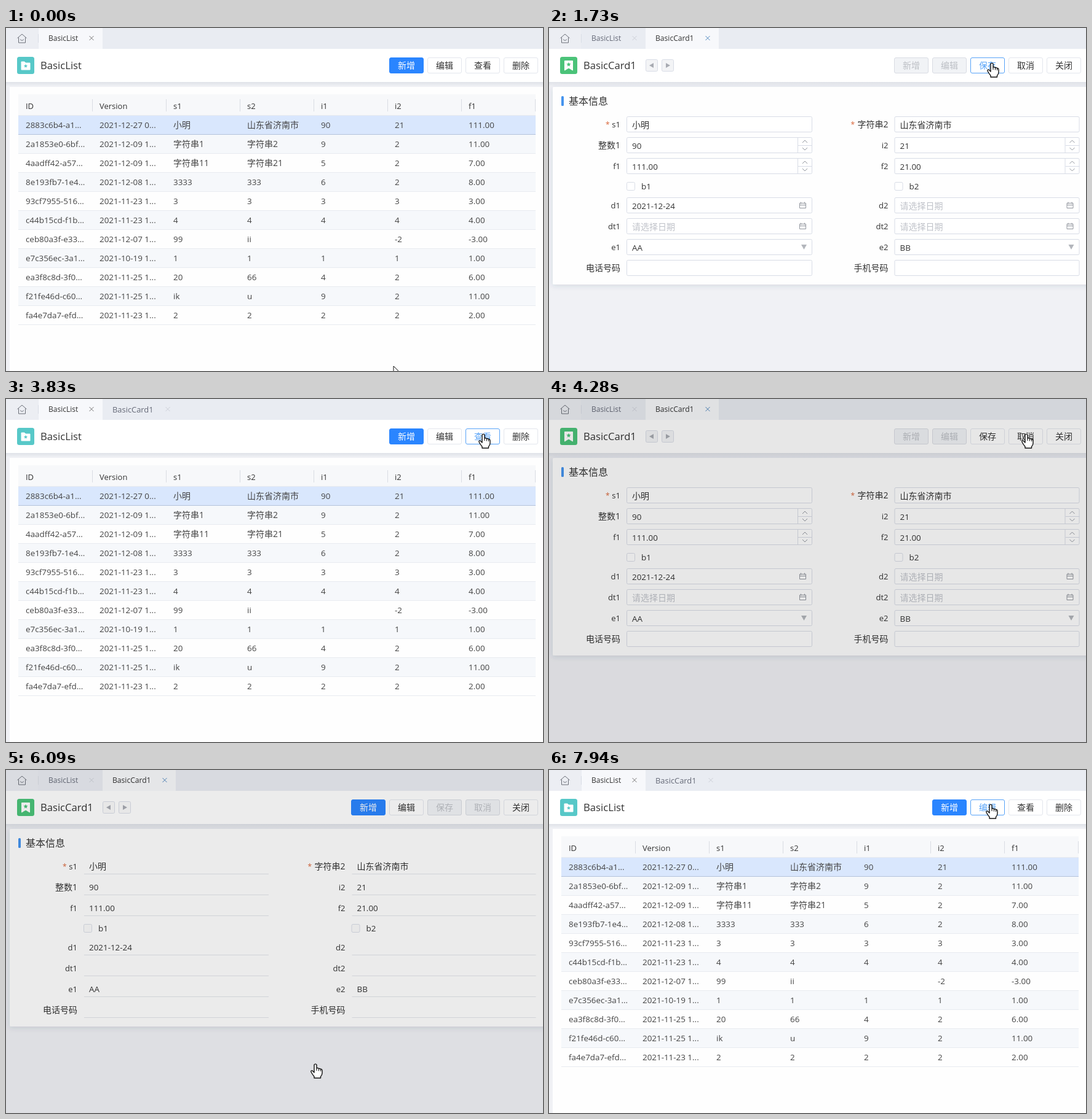
An HTML page that plays this animation: 873x559 px, repeating every 8000 ms.

```html
<!DOCTYPE html>
<html lang="zh-CN">
<head>
<meta charset="utf-8">
<title>BasicList</title>
<style>
html,body{margin:0;width:100%;height:100%;overflow:hidden;background:#f0f1f5}
svg{display:block;width:873px;height:559px}
text{font-family:'Open Sans','Noto Sans CJK SC','Noto Sans CJK',sans-serif;white-space:pre}
</style>
</head>
<body>
<svg viewBox="0 0 873 559">
  <defs>
    <linearGradient id="fall" x2="0" y2="1">
      <stop stop-color="#dfe2e8"/><stop offset="1" stop-color="#f0f1f5"/>
    </linearGradient>
    <filter id="soft" x="-5%" y="-5%" width="110%" height="115%">
      <feDropShadow dx="0" dy="2" stdDeviation="4" flood-color="#34405a" flood-opacity=".14"/>
    </filter>
  </defs>
  <g id="list"></g><g id="card"></g><g id="tabs"></g>
  <rect id="mask" width="873" height="559" opacity="0"/>
  <g id="modal"></g>
  <g id="arrow"><path d="M0 0V16.5L4 13L6.8 19L9.3 18L6.6 12H12Z" fill="#fff" stroke="#111" stroke-linejoin="round"/></g>
  <g id="hand"><path d="M-2 1.5Q0-1.2 2 1.5V7Q4 5.8 5.5 7.8Q7.3 6.7 8.6 8.7Q10.8 8 11 11V15Q11 18 8.5 20.5V23H-2V20.5Q-5 17-7 13Q-7.6 10.5-5 11L-2 14Z" fill="#fff" stroke="#111" stroke-width="1.4" stroke-linejoin="round"/><path d="M2 7V11M5.5 8V11.5M8.6 9V12" stroke="#111" stroke-width="1.1"/></g>
</svg>
<script>
const LOOP = 8000;
const BLUE = '#2a85ff', HOVER = '#57a3f8', PRESS = '#2468c8', INK = '#333', LINE = '#d8dce6';
const $ = id => document.getElementById(id);
const isHan = s => /[\u4e00-\u9fff]/.test(s);

const text = (x, y, s, size = isHan(s) ? 14 : 13.4, fill = INK, anchor = 'start') =>
  `<text x="${x}" y="${y + size * .36}" font-size="${size}" fill="${fill}" text-anchor="${anchor}">${s}</text>`;
const rect = (x, y, w, h, fill, r = 0, more = '') =>
  `<rect x="${x}" y="${y}" width="${w}" height="${h}" rx="${r}" fill="${fill}" ${more}/>`;
const box = (x, y, w, h, fill, stroke, r = 2) =>
  rect(x + .5, y + .5, w - 1, h - 1, fill, r, `stroke="${stroke}"`);
const path = (d, stroke, fill = 'none', w = 1) =>
  `<path d="${d}" fill="${fill}" stroke="${stroke}" stroke-width="${w}"/>`;
const cross = (x, color) => path(`M${x - 3.5} 13l7 7m0-7l-7 7`, color);

function star(x, y, r) {
  let d = '';
  for (let i = 0; i < 10; i++) {
    const a = Math.PI * (i / 5 - .5), k = i % 2 ? r * .45 : r;
    d += (i ? 'L' : 'M') + (x + k * Math.cos(a)).toFixed(2) + ' ' + (y + k * Math.sin(a)).toFixed(2);
  }
  return d + 'Z';
}

function button(x, label, look) {
  const [fill, stroke, ink] = {
    main: [BLUE, BLUE, '#fff'],
    off: ['#f1f3f6', '#d9dce3', '#bcbfc5'],
    hover: ['#fff', HOVER, HOVER],
    press: ['#fff', PRESS, PRESS]
  }[look] || ['#fff', '#e3e6ed', INK];
  return box(x, 48, 56, 26, fill, stroke, 2.5) + text(x + 28, 61, label, 14, ink, 'middle');
}

const page = () => rect(0, 34, 873, 525, '#f0f1f5') + rect(0, 88, 873, 7, 'url(#fall)') + rect(0, 34, 873, 54, '#fff');

const heads = ['ID', 'Version', 's1', 's2', 'i1', 'i2', 'f1'];
const rows = `2883c6b4-a1...|2021-12-27 0...|小明|山东省济南市|90|21|111.00
2a1853e0-6bf...|2021-12-09 1...|字符串1|字符串2|9|2|11.00
4aadff42-a57...|2021-12-09 1...|字符串11|字符串21|5|2|7.00
8e193fb7-1e4...|2021-12-08 1...|3333|333|6|2|8.00
93cf7955-516...|2021-11-23 1...|3|3|3|3|3.00
c44b15cd-f1b...|2021-11-23 1...|4|4|4|4|4.00
ceb80a3f-e33...|2021-12-07 1...|99|ii||-2|-3.00
e7c356ec-3a1...|2021-10-19 1...|1|1|1|1|1.00
ea3f8c8d-3f0...|2021-11-25 1...|20|66|4|2|6.00
f21fe46d-c60...|2021-11-25 1...|ik|u|9|2|11.00
fa4e7da7-efd...|2021-11-23 1...|2|2|2|2|2.00`.split('\n').map(r => r.split('|'));

function listView(hot, look, hotRow) {
  let s = page() + rect(6, 96, 867, 463, '#fefefe');
  s += rect(18, 47, 28, 28, '#57c8c8', 3.5);
  s += path('M25 55H30L32 57H39V68H25Z', '#fff', '#fff') + path(star(32, 62, 3.2), 'none', '#57c8c8');
  s += text(56, 61, 'BasicList', 16.7);
  ['新增', '编辑', '查看', '删除'].forEach((b, i) =>
    s += button(623 + 62 * i, b, i === 0 ? 'main' : i === hot ? look : ''));
  s += rect(20, 108, 841, 34, '#f7f8fa') + rect(20, 142, 841, 1, '#e6e9ef');
  heads.forEach((h, i) => {
    s += text(32 + 120 * i, 127, h, 13) + rect(140 + 120 * i, 116, 1, 20, '#d9dce3');
  });
  rows.forEach((r, j) => {
    const y = 143 + 31 * j;
    const fill = j === 0 ? '#d9e7fd' : j === hotRow ? '#f0f5fd' : j % 2 ? '#f6f8fb' : '#fefefe';
    s += rect(20, y, 841, 30, fill) + rect(20, y + 30, 841, 1, j ? '#e8ebf0' : '#b4c3dc');
    r.forEach((c, i) => s += text(32 + 120 * i, y + 15, c, undefined, '#444'));
  });
  return s;
}

const fields = [
  ['*s1', '小明', '*字符串2', '山东省济南市', 'text', 157],
  ['整数1', '90', 'i2', '21', 'num', 191],
  ['f1', '111.00', 'f2', '21.00', 'num', 225],
  ['b1', '', 'b2', '', 'check', 258],
  ['d1', '2021-12-24', 'd2', '', 'date', 289],
  ['dt1', '', 'dt2', '', 'date', 323],
  ['e1', 'AA', 'e2', 'BB', 'pick', 357],
  ['电话号码', '', '手机号码', '', 'text', 391]
];

function field(x, y, label, value, kind, edit) {
  if (kind === 'check')
    return box(x, y - 7, 14, 14, edit ? '#fff' : '#fafafa', LINE) + text(x + 24, y, label);
  const must = label[0] === '*', name = label.replace('*', ''), right = x + (x < 200 ? 302 : 301);
  let s = text(x - 10, y, name, isHan(name) ? 14 : 13, INK, 'end');
  if (must) s += text(x - (isHan(name) ? 71 : 34), y + 1, '*', 12, '#d9663a');
  if (!edit) return s + rect(x + 1, y + 12, right - x - 2, 1, '#e2e4e9') + text(x + 9, y, value);
  s += box(x, y - 13, right - x, 26, '#fff', LINE);
  s += kind === 'date' && !value ? text(x + 9, y + 1, '请选择日期', 14, '#bfc2c9') : text(x + 9, y + 1, value);
  if (kind === 'num') {
    const e = right - 12;
    s += path(`M${right - 23.5} ${y - 13}v26M${right - 23} ${y + .5}h23`, LINE);
    s += path(`M${e - 4} ${y - 4}l4-4l4 4M${e - 4} ${y + 4}l4 4l4-4`, '#92969e');
  }
  if (kind === 'date') {
    const e = right - 20.5;
    s += path(`M${e} ${y - 3.5}h10v8h-10zm0 3h10m-8-5v3m6-3v3`, '#92969e');
  }
  if (kind === 'pick') s += path(`M${right - 18} ${y - 4}h9l-4.5 8z`, 'none', '#b3b6bc');
  return s;
}

function cardView(edit, hot) {
  let s = page() + rect(6, 96, 875, 322, '#fefefe', 2, 'filter="url(#soft)"');
  s += rect(18, 47, 28, 28, '#4bc379', 3.5);
  s += path('M25.5 53.5H38.5V69L32 65L25.5 69Z', '#fff', '#fff') + path(star(32, 59.5, 3.8), 'none', '#4bc379');
  s += text(56, 61, 'BasicCard1', 16.6);
  const bg = edit ? '#f3f4f6' : '#fafafa';
  s += box(157, 51, 20, 20, bg, LINE) + path('M170 57v8l-7-4z', 'none', '#a8abb2');
  s += box(183, 51, 20, 20, bg, LINE) + path('M190 57v8l7-4z', 'none', '#a8abb2');
  const looks = edit ? ['off', 'off', '', '', ''] : ['main', '', 'off', 'off', ''];
  ['新增', '编辑', '保存', '取消', '关闭'].forEach((b, i) =>
    s += button(561 + 62 * i, b, i === hot && !looks[i] ? 'hover' : looks[i]));
  s += rect(20, 111, 4, 16, '#4594ee', 1.5) + text(32, 119, '基本信息', 16);
  fields.forEach(([a, va, b, vb, kind, y]) =>
    s += field(126, y, a, va, kind, edit) + field(561.5, y, b, vb, kind, edit));
  return s;
}

function tabBar(active, opened, hover) {
  const home = path('M18.5 16.5L26 10L33.5 16.5M20.5 15.5V24H31.5V15.5M23 18.5Q26 22 29 18.5', '#6b6f78');
  let s = rect(0, 0, 873, 34, '#e9ecf2') + rect(0, 0, 52, 34, '#eceef3') + home;
  s += rect(52, 10, 1, 14, '#d9dde5');
  if (active === 0) s += rect(53, 0, 104, 34, '#f7f8fb');
  else if (hover) s += rect(53, 0, 104, 34, '#dfe2ec');
  s += text(69, 17, 'BasicList', 12, active ? '#666a78' : INK);
  s += cross(139, !active || hover ? '#777' : '#cdd0d8');
  if (!opened) return s;
  if (active) {
    s += rect(157, 0, 119, 34, '#f7f8fb') + text(173, 17, 'BasicCard1', 12.1) + cross(258, '#4f86bd');
  } else {
    s += text(173, 17, 'BasicCard1', 12.9, '#666a78') + cross(263, '#cdd0d8');
  }
  return s;
}

const modalView = hot => rect(247, 370, 390, 146, '#fff', 2, 'filter="url(#soft)"') +
  `<circle cx="289.5" cy="421" r="13.3" fill="#f19a32"/>` + text(289.5, 421, '?', 18, '#fff', 'middle') +
  text(315, 421, '确定要切换到初始状态?', 16) +
  rect(477, 464, 64, 32, hot ? '#58a3ff' : BLUE, 3) + text(509, 480, '确定', 14, '#fff', 'middle') +
  box(549, 464, 64, 32, '#fff', '#e3e6ed', 3) + text(581, 480, '取消', 14, INK, 'middle');

// cursor stops: time, x, y
const stops = [
  [0, 630, 551], [50, 630, 551], [300, 696, 300], [480, 715, 150], [680, 720, 57],
  [1979, 720, 57], [1980, 719, 56], [2130, 719, 56], [2450, 400, 62], [2780, 95, 10],
  [2930, 95, 10], [2980, 138, 13], [3200, 240, 70], [3500, 500, 118], [3830, 776, 57],
  [4530, 776, 57], [4850, 655, 270], [5180, 502, 480], [5630, 502, 480], [5680, 504, 480],
  [6090, 504, 480], [6640, 98, 16], [6790, 96, 11], [6860, 96, 11], [7000, 152, 40],
  [7300, 440, 95], [7590, 718, 56], [LOOP, 718, 56]
];
const clamp = v => Math.max(0, Math.min(1, v));
const ramp = (t, a, b) => clamp((t - a) / (b - a));
const ease = u => u * u * (3 - 2 * u);

function cursorAt(t) {
  let i = 1;
  while (stops[i][0] < t) i++;
  const [a, x0, y0] = stops[i - 1], [b, x1, y1] = stops[i], u = ramp(t, a, b);
  return [Math.round(x0 + (x1 - x0) * u), Math.round(y0 + (y1 - y0) * u)];
}

const drawn = {};
function put(id, view, ...args) {
  const key = args.join();
  if (drawn[id] === key) return;
  drawn[id] = key;
  $(id).innerHTML = view(...args);
}

function render(t) {
  const [x, y] = cursorAt(t);
  const onCard = (t >= 1430 && t < 2930) || (t >= 4230 && t < 6860);
  const blocked = t >= 4230 && t < 6140;
  const inside = (l, top, w, h) => x >= l && x < l + w && y >= top && y < top + h;
  const left = onCard ? 561 : 623;
  const slot = Math.floor((x - left) / 62);
  const hot = !blocked && slot >= 0 && inside(left + 62 * slot, 48, 56, 26) ? slot : -1;
  const onTab = !blocked && inside(53, 0, 104, 34);
  const onOk = t >= 4430 && t < 5680 && inside(477, 464, 64, 32);
  const press = (t >= 830 && t < 930) || (t >= 7740 && t < 7890);
  const row = inside(20, 143, 841, 341) ? Math.floor((y - 143) / 31) : -1;

  put('list', listView, hot, press ? 'press' : 'hover', onCard ? -1 : row);
  put('card', cardView, t < 5680, hot);
  put('tabs', tabBar, onCard ? 1 : 0, t >= 1430, onTab);
  put('modal', modalView, onOk);

  const fade = t < 2930 ? .25 + .75 * ramp(t, 1430, 1730) : 1;
  $('card').setAttribute('opacity', onCard ? fade : 0);

  const dim = t < 6000 ? ramp(t, 4180, 4340) : 1 - ramp(t, 6000, 6180);
  $('mask').setAttribute('opacity', (t >= 4230 ? .15 * dim : 0).toFixed(3));

  const open = t < 5600 ? ease(ramp(t, 4280, 4430)) : 1 - ease(ramp(t, 5630, 5880));
  const k = .2 + .8 * open;
  $('modal').setAttribute('opacity', open.toFixed(3));
  $('modal').setAttribute('transform', `translate(${777 * (1 - k)} ${57 * (1 - k)}) scale(${k})`);

  const idle = (t >= 4230 && t < 4560) || (t >= 5600 && t < 6120);
  const pointing = hot >= 0 || onTab || onOk || idle;
  for (const id of ['arrow', 'hand']) {
    $(id).setAttribute('transform', `translate(${x} ${y})`);
    $(id).setAttribute('visibility', (id === 'hand') === pointing ? 'visible' : 'hidden');
  }
}

const start = performance.now();
function tick() {
  render((performance.now() - start) % LOOP);
  requestAnimationFrame(tick);
}
tick();
</script>
</body>
</html>
```
